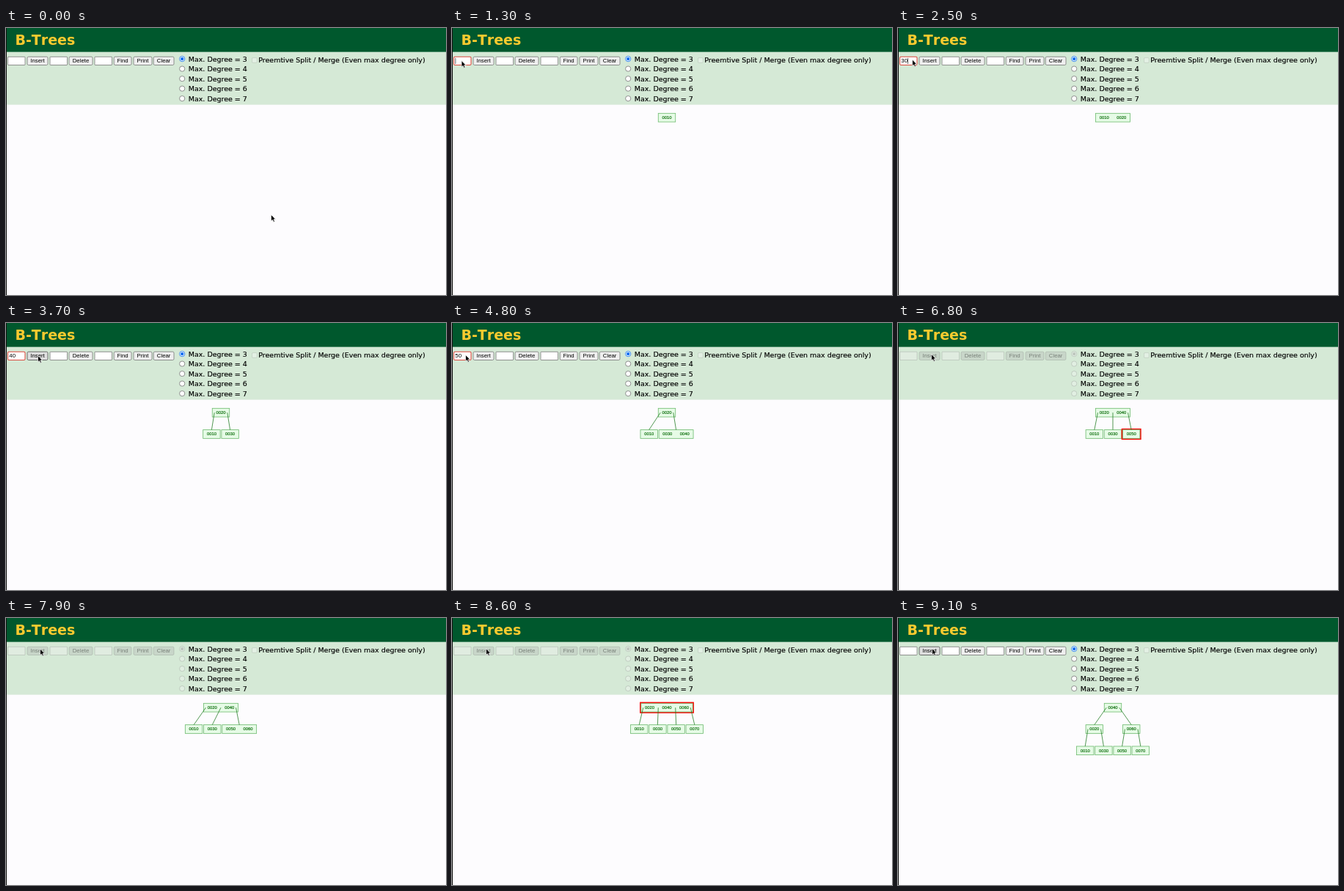
Write an HTML page that moves like this. It is 600x364 px and loops after 9400 ms.

```html
<!DOCTYPE html>
<html lang="en">
<head>
<meta charset="utf-8">
<title>B-Trees</title>
<style>
  html, body { margin: 0; height: 100%; overflow: hidden; background: #fdfcfe; }
  svg { display: block; width: 600px; height: 364px; }
  text { white-space: pre; }
  .title { font: bold 19px Verdana, "DejaVu Sans", sans-serif; fill: #fbca2f; font-kerning: none; }
  .label { font: 9.48px Verdana, "DejaVu Sans", sans-serif; stroke: #000; stroke-width: 0.15; }
  .control { font: 7.8px Arial, "Liberation Sans", sans-serif; }
  .key { font: 10px Arial, "Liberation Sans", sans-serif; fill: #060; stroke: #060; stroke-width: 0.25; }
  .key, .middle { text-anchor: middle; }
</style>
</head>
<body>
<svg id="stage" viewBox="0 0 600 364"></svg>
<script>
const LOOP = 9400, STEP = 100;
const SCALE = 0.586, ROOT_X = 500, ROOT_Y = 30, LEVEL = 50, KEY_W = 40, NODE_H = 20, GAP = 3;
const stage = document.getElementById('stage');

const rect = (x, y, w, h, attrs) => `<rect x="${x}" y="${y}" width="${w}" height="${h}" ${attrs}/>`;
const text = (x, y, cls, str, attrs = '') => `<text x="${x}" y="${y}" class="${cls}" ${attrs}>${str}</text>`;
const latest = (list, t) => list.findLast(item => item[0] <= t);

// Tree states: start time, root, time taken to slide into place
const node = (keys, ...kids) => ({ keys: keys.split(' '), kids });
const trees = [
  [0, null, 0],
  [1100, node('10'), 0],
  [2000, node('10 20'), 200],
  [3000, node('10 20 30'), 0],
  [3100, node('20', node('10'), node('30')), 300],
  [4300, node('20', node('10'), node('30 40')), 200],
  [5300, node('20', node('10'), node('30 40 50')), 100],
  [5400, node('20 40', node('10'), node('30'), node('50')), 300],
  [6900, node('20 40', node('10'), node('30'), node('50 60')), 200],
  [8200, node('20 40', node('10'), node('30'), node('50 60 70')), 100],
  [8400, node('20 40 60', node('10'), node('30'), node('50'), node('70')), 200],
  [8700, node('40', node('20', node('10'), node('30')), node('60', node('50'), node('70'))), 300]
];

// Highlighted node: start, end, a key it holds
const highlights = [
  [1900, 2100, '10'], [2900, 3100, '10'],
  [4100, 4200, '20'], [4200, 4400, '30'],
  [5100, 5200, '20'], [5200, 5400, '30'],
  [6700, 6800, '20'], [6800, 7000, '50'],
  [8000, 8100, '20'], [8100, 8400, '50'], [8500, 8700, '20']
];

// Form: start time, field text, mode
const form = [
  [0, '', 'idle'], [500, '', 'focus'], [600, '1', 'focus'], [700, '10', 'focus'],
  [1000, '', 'busy'], [1200, '', 'idle'], [1300, '', 'focus'], [1400, '2', 'focus'], [1500, '20', 'focus'],
  [1800, '', 'busy'], [2200, '', 'idle'], [2300, '', 'focus'], [2400, '3', 'focus'], [2500, '30', 'focus'],
  [2800, '', 'busy'], [3400, '', 'focus'], [3500, '4', 'focus'], [3600, '40', 'focus'],
  [4000, '', 'busy'], [4500, '', 'idle'], [4600, '', 'focus'], [4700, '5', 'focus'], [4800, '50', 'focus'],
  [5000, '', 'busy'], [5900, '', 'idle'], [6000, '', 'focus'], [6100, '6', 'focus'], [6200, '60', 'focus'],
  [6600, '', 'busy'], [7200, '', 'idle'], [7400, '', 'focus'], [7500, '7', 'focus'], [7600, '70', 'focus'],
  [7900, '', 'busy'], [9100, '', 'idle']
];

// Pointer stops: time, x, y
const pointer = [
  [0, 362, 255], [400, 14, 45], [700, 14, 45], [900, 45, 45], [1000, 45, 45], [1200, 13.5, 45],
  [1500, 13.5, 45], [1700, 45, 44], [1900, 45, 44], [2200, 20, 43.5], [2500, 20, 43.5], [2700, 44, 44],
  [2900, 44, 44], [3300, 18, 44], [3500, 18, 44], [3700, 44, 45], [4100, 44, 45], [4500, 19, 44],
  [4800, 19, 44], [5000, 45, 44], [5200, 45, 44], [5500, 18.5, 43.5], [6200, 18.5, 43.5], [6500, 46, 43],
  [6800, 46, 43], [7200, 19, 43], [7600, 19, 43], [7800, 47, 42.5], [8000, 47, 42.5], [9000, 47, 42]
];

function pointerAt(t) {
  const i = pointer.findLastIndex(stop => stop[0] <= t);
  const [t0, x0, y0] = pointer[i], [t1, x1, y1] = pointer[i + 1] || [LOOP, x0, y0];
  const f = (t - t0) / (t1 - t0);
  return [x0 + (x1 - x0) * f, y0 + (y1 - y0) * f];
}

const widthOf = n => n.keys.length * KEY_W;
const kidsSpan = n => n.kids.reduce((sum, kid) => sum + spanOf(kid) + GAP, -GAP);
const spanOf = n => Math.max(widthOf(n), kidsSpan(n));
const flatten = n => n ? [n, ...n.kids.flatMap(flatten)] : [];

function layout(n, x, y) {
  if (!n) return;
  n.x = x;
  n.y = y;
  let left = x - kidsSpan(n) / 2;
  for (const kid of n.kids) {
    layout(kid, left + spanOf(kid) / 2, y + LEVEL);
    left += spanOf(kid) + GAP;
  }
}

// A node starts out where its keys were in the previous tree
function setStart(n, before) {
  const spots = before.flatMap(old => old.keys.map((key, i) => (
    { key, x: old.x + (i - (old.keys.length - 1) / 2) * KEY_W, y: old.y }
  ))).filter(spot => n.keys.includes(spot.key));
  n.y0 = Math.min(n.y, ...spots.map(spot => spot.y));
  const top = spots.filter(spot => spot.y === n.y0);
  n.x0 = top.length ? top.reduce((sum, spot) => sum + spot.x, 0) / top.length : n.x;
}

trees.forEach(([, root], i) => {
  layout(root, ROOT_X, ROOT_Y);
  const before = i ? flatten(trees[i - 1][1]) : [];
  flatten(root).forEach(n => setStart(n, before));
});

function drawTree(t) {
  const [start, root, duration] = latest(trees, t);
  const f = duration ? Math.min(1, (t - start) / duration) : 1;
  const lit = highlights.find(h => h[0] <= t && t < h[1]);
  const halo = t % 200 ? 4 : 3;
  const place = n => [n.x0 + (n.x - n.x0) * f, n.y0 + (n.y - n.y0) * f];
  let boxes = '', edges = '';
  for (const n of flatten(root)) {
    const [x, y] = place(n), w = widthOf(n), left = x - w / 2;
    if (lit && n.keys.includes(lit[2]))
      boxes += rect(left - halo, y - NODE_H / 2 - halo, w + 2 * halo, NODE_H + 2 * halo, 'fill="#f00"');
    boxes += rect(left, y - NODE_H / 2, w, NODE_H, 'fill="#e6fbe6" stroke="#6fbb70" stroke-width="1.4"');
    n.keys.forEach((key, i) => boxes += text(left + (i + 0.5) * KEY_W, y + 3.4, 'key', '00' + key));
    n.kids.forEach((kid, i) => {
      const [kx, ky] = place(kid);
      const ex = i === 0 ? left + 5 : i === n.keys.length ? left + w - 5 : left + i * KEY_W;
      edges += `<path d="M${ex} ${y}L${kx} ${ky - NODE_H / 2}" stroke="#1c7a1e" stroke-width="1.3"/>`;
    });
  }
  return `<g transform="translate(0 104.6) scale(${SCALE})">${boxes}${edges}</g>`;
}

function drawForm(t, px, py) {
  const [, typed, mode] = latest(form, t);
  const busy = mode === 'busy', focus = mode === 'focus';
  const fade = busy ? 0.33 : 1;
  const hover = !busy && px > 29 && px < 57 && py > 39 && py < 51;
  let out = '';
  [2.5, 60, 121].forEach((x, i) => {
    const active = focus && i === 0;
    out += rect(x, 39.3, 23.5, 11.2, `rx="${active ? 1.5 : 0.5}" fill="${busy ? '#efefef' : '#fff'}"
      fill-opacity="${busy ? 0.4 : 1}" stroke="${active ? '#dc4a40' : '#767676'}"
      stroke-opacity="${fade}" stroke-width="${active ? 1.1 : 0.8}"`);
  });
  out += text(4.3, 47.4, 'control', typed);
  if (focus && t % 1000 < 600) out += rect(4.6 + typed.length * 4.4, 41, 0.6, 8, '');

  [['Insert', 29, 28], ['Delete', 86, 32], ['Find', 147.2, 23.8], ['Print', 174, 25], ['Clear', 201.2, 27.8]]
    .forEach(([name, x, w], i) => {
      const over = hover && i === 0;
      out += rect(x, 39.2, w, 11.3, `rx="1.7" fill="${busy ? '#c8d6c9' : over ? '#dedede' : '#efefef'}"
        stroke="${over ? '#4f4f4f' : '#767676'}" stroke-opacity="${fade}" stroke-width=".8"`)
        + text(x + w / 2, 47.4, 'control middle', name, `fill-opacity="${busy ? 0.4 : 1}"`);
    });

  for (let i = 0; i < 5; i++) {
    const y = 42.1 + i * 13.5, color = i || busy ? '#767676' : '#0a6cf0';
    out += `<circle cx="240.2" cy="${y}" r="3.6" fill="#fff" fill-opacity="${busy ? 0.3 : 1}"
      stroke="${color}" stroke-opacity="${fade}" stroke-width=".8"/>`;
    if (!i) out += `<circle cx="240.2" cy="${y}" r="2.2" fill="${color}" fill-opacity="${fade}"/>`;
    out += text(248.8, y + 3.4, 'label', 'Max. Degree = ' + (i + 3));
  }
  return out
    + rect(335.6, 40.7, 6.6, 6.6, 'rx="1" fill="#fff" fill-opacity=".35" stroke="#767676" stroke-opacity=".3" stroke-width=".6"')
    + text(344.3, 47.4, 'label', 'Preemtive Split / Merge (Even max degree only)');
}

function draw(t) {
  const [px, py] = pointerAt(t);
  stage.innerHTML = rect(0, 0, 600, 364, 'fill="#fdfcfe"')
    + rect(0, 32, 600, 72.6, 'fill="#d5e9d6"')
    + rect(0, 0, 600, 32.6, 'fill="#00582d"')
    + rect(0, 0, 1, 364, 'fill="#111"')
    + text(12.5, 22.8, 'title', 'B-Trees')
    + drawForm(t, px, py)
    + drawTree(t)
    + `<path transform="translate(${px} ${py})" d="M-.5 -.5V8.2L1.5 6.4L2.9 9.4L4.4 8.7L3.1 5.8H5.6Z"
        stroke="#fff" stroke-width=".7"/>`;
}

const origin = performance.now();
let shown = -1;
function tick() {
  const now = (performance.now() - origin) % LOOP;
  const t = Math.floor(now / STEP) * STEP;
  if (t !== shown) draw(shown = t);
  requestAnimationFrame(tick);
}
tick();
</script>
</body>
</html>
```
